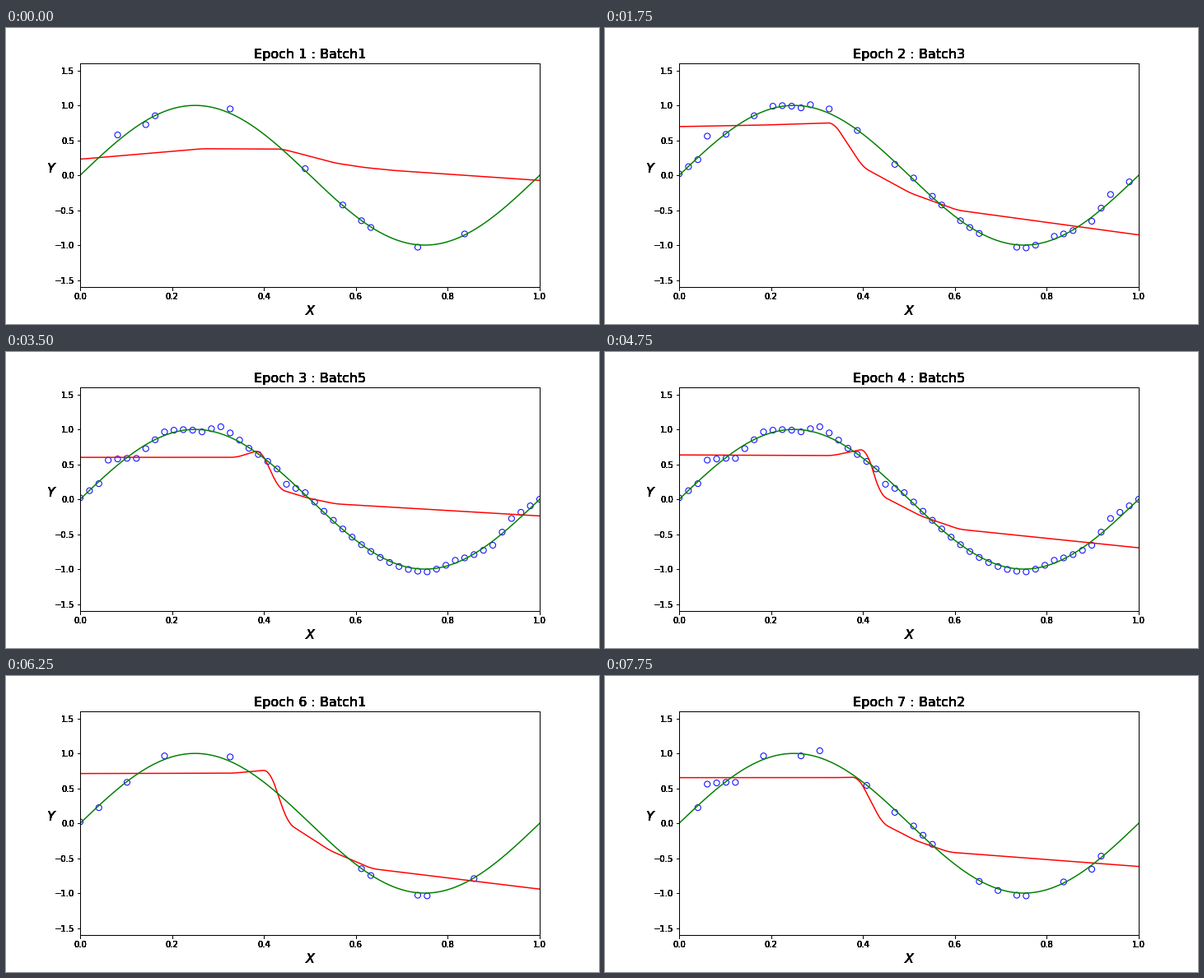
Animation of 720 by 360 pixels, one loop 8 s. Source, as a matplotlib script:

```python
import random

import matplotlib.pyplot as plt
import numpy as np
from matplotlib.animation import FuncAnimation

FRAMES, STEP = 32, 250
BATCHES, BATCH_SIZE, POINTS = 5, 10, 50
LAYERS = 8

plt.rcParams["font.family"] = "DejaVu Sans"


def wave(x):
    return np.sin(2 * np.pi * x)


# Noisy samples: the sine plus an error that wanders between a few peaks.
peaks = {0: .02, 2: -.03, 3: .185, 6: -.11, 9: .05, 13: -.03, 15: .1, 18: -.01,
         21: 0, 22: -.1, 24: .03, 37: -.04, 40: .04, 44: -.06, 46: .1, 49: 0}
sample_x = np.linspace(0, 1, POINTS)
sample_y = wave(sample_x) + np.interp(range(POINTS), list(peaks), list(peaks.values()))

# Fit at some moments: start y, then x, y of shoulder, crest, foot, knee, then end y.
fits = {
    0: [.23, .265, .38, .44, .375, .555, .175, .68, .07, -.075],
    4: [.61, .025, .67, .285, .665, .375, .20, .55, 0, -.21],
    10: [.784, .335, .766, .388, .84, .425, .03, .661, -1, -1.5],
    14: [.60, .34, .60, .393, .71, .433, .145, .556, -.066, -.24],
    19: [.635, .333, .625, .407, .725, .438, .06, .61, -.43, -.696],
    25: [.712, .333, .717, .412, .765, .452, 0, .635, -.65, -.944],
    31: [.653, .335, .653, .39, .66, .442, 0, .588, -.414, -.62],
}
grid = np.linspace(0, 1, 400)
blur = np.linspace(-0.012, 0.012, 9)


def fitted_curve(frame):
    """Blend the fits in time, then round the corners of the polyline."""
    start, *inner, end = [np.interp(frame, list(fits), column)
                          for column in zip(*fits.values())]
    shoulder, crest, foot, knee = np.reshape(inner, (4, 2))
    sag = (foot + knee) / 2 + [0, 0.1 * (knee[1] - foot[1])]
    x, y = np.array([(0, start), shoulder, crest, foot, sag, knee, (1, end)]).T
    return np.mean([np.interp(grid + shift, x, y) for shift in blur], axis=0)


def draw_order(epoch):
    return random.Random(epoch).sample(range(POINTS), POINTS)


def add_axes(fig):
    ax = fig.add_axes([0.125, 0.125, 0.775, 0.755])
    ax.patch.set_visible(False)
    ax.set(xlim=(0, 1), ylim=(-1.6, 1.6), yticks=np.arange(-1.5, 1.6, 0.5))
    ax.set_xlabel("X", fontsize=16, style="italic", labelpad=5)
    ax.set_ylabel("Y", fontsize=16, style="italic", rotation=0)
    return ax


fig = plt.figure(figsize=(10, 5), dpi=72, facecolor="white")
# Stacked axes give the lettering its heavy weight.
layers = [add_axes(fig) for _ in range(LAYERS)]
ax = layers[0]
titles = [layer.set_title("", fontsize=16) for layer in layers]

dots = ax.scatter([], [], s=50, facecolors="none", edgecolors="blue", linewidths=1)
fit_line, = ax.plot([], [], color="red", lw=1.5)
ax.plot(grid, wave(grid), color="green", lw=1.5)


def update(frame):
    epoch, batch = frame // BATCHES + 1, frame % BATCHES + 1
    seen = draw_order(epoch)[:batch * BATCH_SIZE]
    dots.set_offsets(np.column_stack([sample_x[seen], sample_y[seen]]))
    fit_line.set_data(grid, fitted_curve(frame))
    for title in titles:
        title.set_text(f"Epoch {epoch} : Batch{batch}")
    return [dots, fit_line, *titles]


anim = FuncAnimation(fig, update, frames=FRAMES, interval=STEP, repeat=True,
                     repeat_delay=0, blit=False)
plt.show()
```
